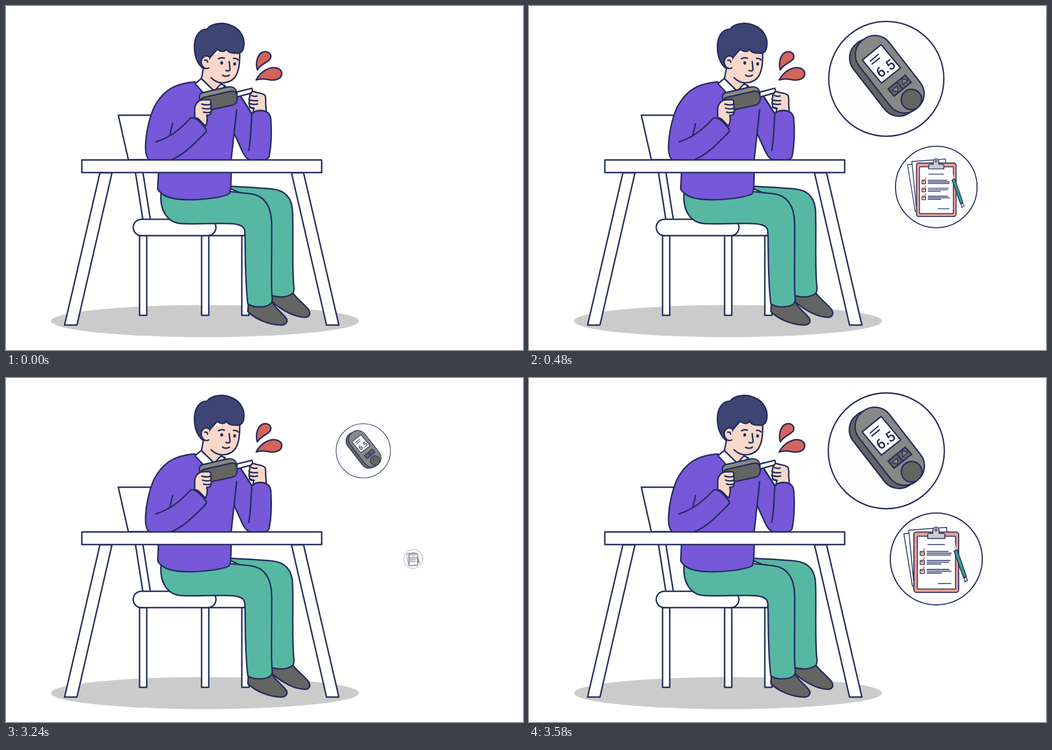
Write an HTML page with a canvas that moves like this. It is 900 px wide and 600 px high and loops after 6000 ms.

```html
<!DOCTYPE html>
<html lang="en">
<head>
<meta charset="utf-8">
<title>Glucose check</title>
<style>
html, body { margin: 0; width: 100%; height: 100%; overflow: hidden; background: #fff; }
canvas { display: block; width: 900px; height: 600px; }
</style>
</head>
<body>
<canvas id="stage" width="900" height="600"></canvas>
<script>
const canvas = document.getElementById('stage');
const W = 900, H = 600;
const dpr = window.devicePixelRatio || 1;
canvas.width = W * dpr;
canvas.height = H * dpr;

const INK = '#242c5c', WHITE = '#fff', SKIN = '#f9d8ca', HAIR = '#3e4573',
  PURPLE = '#7658d8', GREEN = '#56b8a2', DARK = '#646462', GREY = '#888886',
  RED = '#d3645a', SALMON = '#eb9f92';

function painter(c) {
  c.lineCap = c.lineJoin = 'round';
  const shape = (d, fill, width = 2.5, color = INK) => {
    const p = d instanceof Path2D ? d : new Path2D(d);
    if (fill) { c.fillStyle = fill; c.fill(p); }
    if (width) { c.strokeStyle = color; c.lineWidth = width; c.stroke(p); }
  };
  const box = (x, y, w, h, r, fill, width = 2.5) => {
    const p = new Path2D();
    p.roundRect(x, y, w, h, r);
    shape(p, fill, width);
  };
  const oval = (x, y, rx, ry, fill, width = 0) => {
    const p = new Path2D();
    p.ellipse(x, y, rx, ry, 0, 0, Math.PI * 2);
    shape(p, fill, width);
  };
  return { shape, box, oval };
}

function drawChair({ shape, box }) {
  shape('M195.5 190.5H275L285 268H213Z', WHITE);
  shape('M225 288L238.5 374H251.5L238 288Z', WHITE);
  shape('M340 372H416V400.5H340Z', WHITE);
  for (const x of [232.5, 340.5, 410.5]) box(x, 400.5, 12.5, 139, 0, WHITE);
  box(221.5, 372, 144, 28.5, 14.2, WHITE);
}

function drawLegs({ shape }) {
  shape('M463 503L499 500C507 512 521 521 527 530C531 537 528 543 520 543C500 542 480 530 463 516Z', DARK);
  shape('M380 314C415 315.5 440 317 462 319C486 321 499 335 499 362C500 400 498 445 500.5 484C502 492 502 497 499.5 501C490 508 476 509 462 505L440 340Z', GREEN);
  shape('M422 517L421 533C435 547 460 557 480 556.5C488 556 491 550 488 545C482 535 468 528 463 515Z', DARK);
  shape('M270 325C267 355 280 378 305 379.5C340 381 375 378 397 380C411 382 416 386 416 396C417 440 416 480 421 519.5C432 527 451 526 460 520Q465 516 463 505C461 480 463 430 462.5 380C462 349 451 331 426 327.5L384 323Z', GREEN);
}

function drawTorso({ shape }) {
  // far arm
  shape('M376 142L408 157L428 188C430 184 440 181 449 183C457 185 460 189 461 197C463 225 461 248 458 263Q455 268.5 448 268.5H426C418 268 412 256 408 246L397 222Z', PURPLE);
  // body
  shape('M329 132.5C287 135 270 154 258 176C248 198 242 230 243 252C244 262 247 268 252 269L266.5 270L264 319C271 331 285 338 318 338C350 338 378 333 388 328C391 324 391.5 318 392 291V268L401.5 181L408 157L376 138Z', PURPLE, 0);
  shape('M329 132.5C287 135 270 154 258 176C248 198 242 230 243 252C244 262 247 268 252 269L266.5 270L264 319C271 331 285 338 318 338C350 338 378 333 388 328C391 324 391.5 318 392 291V268L401.5 181');
  shape('M376 138L408 157L428 188C426 210 427 230 422.5 252');
  // near arm
  shape('M261 237C284 230 303 216 321 195.5C330 192 342 206 348 214.5Q350 218 347 221C330 238 311 259 288 268', PURPLE);
  shape('M290 205L285 226');
}

function drawHead({ shape, oval }) {
  shape('M345 102L340 128L360 149L376 138L373 130Z', SKIN);
  shape('M329 135.5L340 126.5L362 148L346 154Z', WHITE);
  shape('M374 136L381.5 139L374 148L364 147Z', WHITE);
  shape('M354 86L407 74C408 98 406 112 400 122C393 134 376 136 367 132L344 122L346 100Z', SKIN, 0);
  shape('M407 78C407 98 406 112 400 122C393 134 376 136 367 132Q361 129.5 357 125');
  shape('M342 108C332 99 328 86 328 71C328 53 337 40 350 40.5C358 29 379 28 392 34C409 41 417 56 413.5 73C412 81 405 83.5 400 82C392 83 386 80 384 75.5C380 81 372 80 368 75C362 83 356 87 353 94Z', HAIR);
  shape('M354 89C347 84 339 90 340 99C341 107 347 111 353 108', SKIN);
  shape('M346 94.5C349 93.5 351 95.5 351 98');
  oval(375.5, 99.3, 2.5, 3, INK);
  oval(398, 101, 2.5, 3, INK);
  shape('M370 92C373 90 377 90 380 91');
  shape('M396 91.5C399 91 402 92 404 94');
  shape('M388.5 97L390 111C389 113.5 386 113.5 383 112.5');
  shape('M377 120.5C380 123 386 123 389 120.5');
}

function drawTest({ shape }) {
  shape('M400 150.5L428 143.5L430 151L401 159Z', WHITE);
  shape('M339 168C335 158 336 153 343 151L384 141.5C394 139.5 400 142 402 152V162L350 178Z', GREY);
  shape('M344 159.5L390 149C398 147.5 401 150 402 156C404 166 400 171.5 394 173L352 182C345 183 341 178 340 172C338 165 339 161 344 159.5Z', DARK);
  // near hand
  shape('M328.5 195L328.5 178C330 168 337 163.5 345 163.5H354Q358 165.5 356 171Q358 174 356.5 178Q358.5 182 356.5 185Q357 190 352 190.5H349.5C351 197 350 204 347.5 209.5C339 202 335 194 328.5 195Z', SKIN);
  shape('M341 171C346 173 351 173 356 171.5M342 178C346 180 351 180 357 178.5M344 185C348 186.5 352 186.5 357 185');
  // far hand
  shape('M429.5 187L431.5 179C426 179 423 177 424 173Q422 169 424 166Q422 162 424.5 159Q423 155 427 152Q427 148.5 432 149.5C438 152 447 151.5 451 156Q452.5 160 452 170L453 184C445 181 434 181 429.5 187Z', SKIN);
  shape('M427 156C431 158 434 158 437 157M425 164C430 165.5 434 165.5 438 165M425 170.5C430 172 434 172 438 171M425 176.5L432 178.5');
  // drops
  shape('M437.5 111.5C434 100 437 84 448 80C456 77.5 463 84 460.5 91C457 99 444 100 437.5 111.5Z', RED);
  shape('M435.5 129C441 118 452 109 464 107.5C474 107 481 112 480 119C479 127 470 130 460 129C452 127 444 126 435.5 129Z', RED);
}

function drawTable({ shape, box }) {
  shape('M163.5 291L102 556.5H123.5L184.5 291Z', WHITE);
  shape('M497 291L558 556.5H579.5L518 291Z', WHITE);
  box(132, 268.5, 417.5, 22, 0, WHITE);
}

function drawMeter(c, { shape, box, oval }) {
  oval(622, 127, 101, 101, '#fdfdfd', 2.3);
  const face = new Path2D();
  face.roundRect(-76.5, -33.5, 153, 67, 32);
  const tilt = (x, y, fn) => {
    c.save();
    c.translate(x, y);
    c.rotate(52.3 * Math.PI / 180);
    fn();
    c.restore();
  };
  tilt(618, 124.5, () => shape(face, DARK));
  tilt(628, 119, () => {
    shape(face, GREY, 0);
    c.save();
    c.clip(face);
    oval(58.5, -3, 18, 18, DARK, 2.4);
    c.restore();
    shape(face, null, 2.4);
  });
  shape('M580 94L613 67L647 108L613.5 134.5Z', WHITE, 2.3);
  shape('M594 96L608 84M597 101L610 90.5', null, 2.3);
  shape('M625 145L655 120.5L666 133L635.5 157.5ZM640.5 133L650.5 145', DARK, 2.3);
  shape('M631.5 147.5L641 139.5L642.5 150Z', GREY, 1.6);
  shape('M649.5 127L651 137.5L660 129.5Z', GREY, 1.6);
  c.save();
  c.translate(620.5, 108.5);
  c.rotate(-36 * Math.PI / 180);
  c.fillStyle = INK;
  c.font = '500 25px Roboto, Arial, sans-serif';
  c.textAlign = 'center';
  c.textBaseline = 'alphabetic';
  c.fillText('6.5', 0, 9);
  c.restore();
}

function drawClipboard(c, { shape, box, oval }) {
  oval(709, 315.7, 80.2, 80.2, '#fdfdfd', 2);
  shape('M652.5 272L700 266L712 356L667.5 363.5Z', WHITE, 1.5);
  shape('M661 265.5L727 260.5L734 348L669.5 354Z', WHITE, 1.5);
  box(670, 268.5, 78, 105.5, 4.5, SALMON, 1.8);
  box(676, 276, 66.5, 92, 1, WHITE, 1.6);
  shape('M694 280V274Q694 271 698 271H703V266C703 258 714 258 714 266V271H720Q724 271 724 274V280Z', '#c9cbd0', 1.6);
  oval(708.6, 265, 1.8, 1.8, WHITE, 1.4);
  shape('M694.5 290.5H723.5M712.5 358.5H734.5', null, 1.6);
  const ends = [[730, 735, 734], [733, 731, 717], [731, 735, 718]];
  ends.forEach((row, i) => {
    const y = 302.5 + i * 15.7;
    row.forEach((x, j) => shape(`M693 ${y + j * 3.1}H${x}`, null, 1.6));
    box(681, y, 7, 6.8, 0, WHITE, 1.5);
    shape(`M682.5 ${y + 1}L684.5 ${y + 4}L688 ${y - 4.5}`, null, 1.8, '#e0604f');
  });
  shape('M741 289L743.5 300', WHITE, 1.3, '#fff');
  shape('M740 302L745.5 299.8L761.5 346.5L756.5 348.8Z', '#38a08f', 1.6);
  shape('M757.5 349L761 347.5L762.5 351L764 353L759 356L758.5 352Z', WHITE, 1.4);
}

// The scene never moves, so it is painted once.
const scene = document.createElement('canvas');
scene.width = canvas.width;
scene.height = canvas.height;
const back = scene.getContext('2d');
back.scale(dpr, dpr);
back.fillStyle = WHITE;
back.fillRect(0, 0, W, H);
const backPen = painter(back);
backPen.oval(346.5, 549.5, 268, 28, '#cbcbcb');
[drawChair, drawLegs, drawTorso, drawHead, drawTest, drawTable].forEach(draw => draw(backPen));

const ctx = canvas.getContext('2d');
const pen = painter(ctx);
const bubbles = [
  { x: 622, y: 127, start: -8, span: 517, draw: drawMeter },
  { x: 709, y: 315.7, start: 90, span: 500, draw: drawClipboard },
];
const PERIOD = 3000, STEP = 20;

function easeSine(t) {
  const p = Math.min(1, Math.max(0, t));
  return (1 - Math.cos(Math.PI * p)) / 2;
}

function render(now) {
  const t = Math.floor((now % PERIOD) / STEP) * STEP;
  ctx.setTransform(1, 0, 0, 1, 0, 0);
  ctx.drawImage(scene, 0, 0);
  for (const b of bubbles) {
    const s = t < STEP ? 0 : easeSine((t - b.start) / b.span);
    if (s <= 0) continue;
    ctx.setTransform(dpr, 0, 0, dpr, 0, 0);
    ctx.translate(b.x, b.y);
    ctx.scale(s, s);
    ctx.translate(-b.x, -b.y);
    b.draw(ctx, pen);
  }
}

const begin = performance.now();
function tick() {
  render(performance.now() - begin);
  requestAnimationFrame(tick);
}
tick();
</script>
</body>
</html>
```
